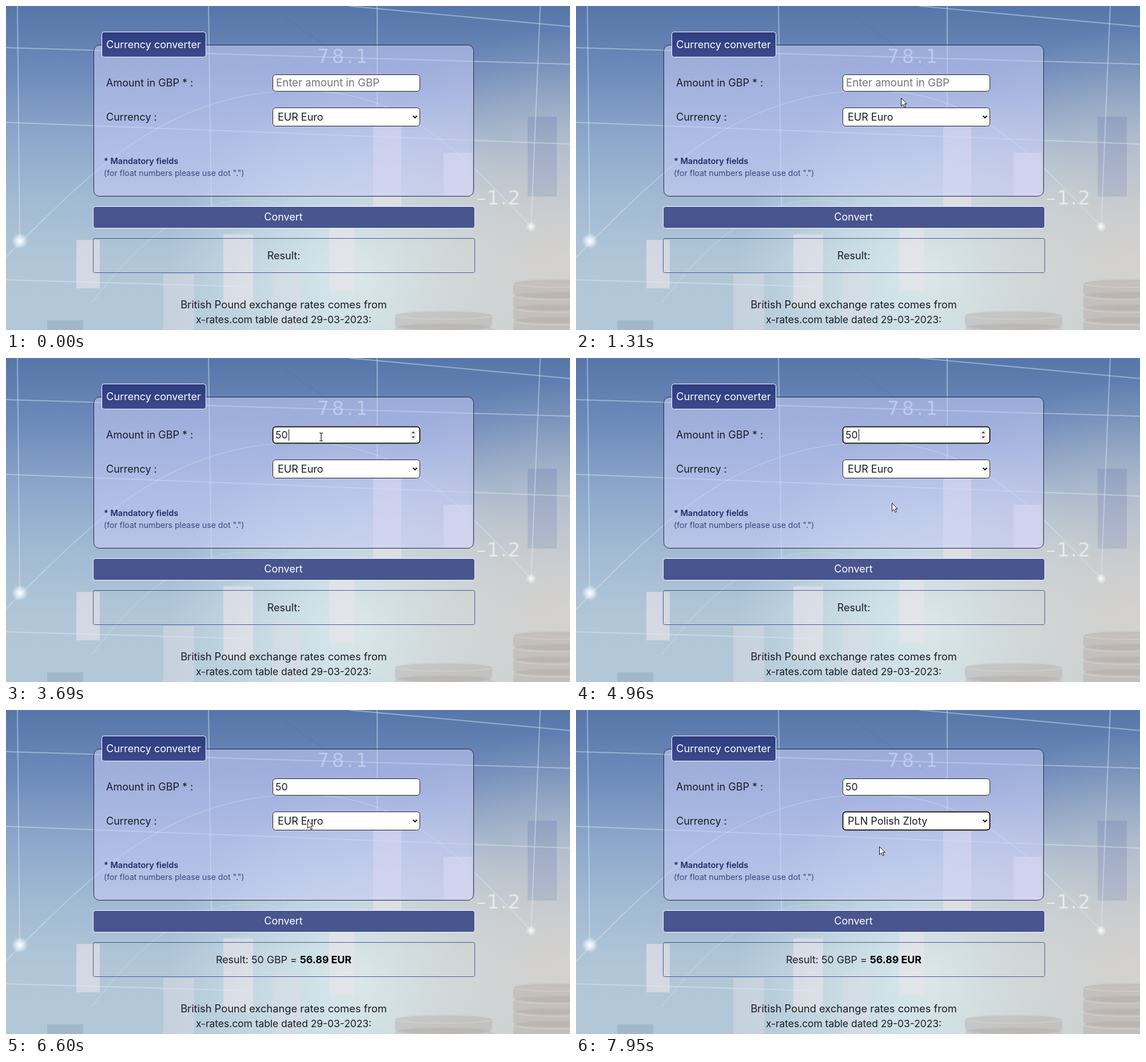
An HTML page with a canvas that plays this animation: 986x568 px, repeating every 8000 ms.

```html
<!DOCTYPE html>
<html lang="en">
<head>
<meta charset="utf-8">
<title>Currency converter</title>
<style>
html, body { margin: 0; width: 100%; height: 100%; overflow: hidden; background: #7d9cc4; }
canvas { display: block; width: 986px; height: 568px; }
</style>
</head>
<body>
<canvas id="stage" width="986" height="568"></canvas>
<script>
const W = 986, H = 568, LOOP = 8000;
const stage = document.getElementById('stage').getContext('2d');
const backdrop = document.createElement('canvas');
backdrop.width = W;
backdrop.height = H;
let ctx = stage;

const SANS = 'Inter, "Open Sans", sans-serif';
const WIDE = '"DejaVu Sans", sans-serif';
const INK = '#1b1b26';
const OPTIONS = ['EUR Euro', 'PLN Polish Zloty', 'USD US Dollar'];

const BUTTON = { x: 152.5, y: 351.5, w: 667, h: 38 };
const INPUT = { x: 466.5, y: 120.5, w: 257, h: 29 };
const SELECT = { x: 466.5, y: 178.5, w: 257, h: 32 };
const inside = (p, b) => p.x >= b.x && p.x <= b.x + b.w && p.y >= b.y && p.y <= b.y + b.h;

function label(text, x, y, { size = 18, weight = 400, color = INK, align = 'left', font = SANS } = {}) {
  ctx.font = `${weight} ${size}px ${font}`;
  ctx.fillStyle = color;
  ctx.textAlign = align;
  ctx.fillText(text, x, y);
  return ctx.measureText(text).width;
}

function box({ x, y, w, h }, radius, fill, stroke, line = 1) {
  ctx.beginPath();
  ctx.roundRect(x, y, w, h, radius);
  if (fill) { ctx.fillStyle = fill; ctx.fill(); }
  if (stroke) { ctx.strokeStyle = stroke; ctx.lineWidth = line; ctx.stroke(); }
}

function rect(x, y, w, h, fill) {
  ctx.fillStyle = fill;
  ctx.fillRect(x, y, w, h);
}

function trace(path, color, width = 1) {
  ctx.strokeStyle = color;
  ctx.lineWidth = width;
  ctx.stroke(new Path2D(path));
}

function linear(y0, y1, colors) {
  const g = ctx.createLinearGradient(0, y0, 0, y1);
  colors.forEach((c, i) => g.addColorStop(i / (colors.length - 1), c));
  return g;
}

function glow(x, y, r, rgb, alpha) {
  const g = ctx.createRadialGradient(x, y, 0, x, y, r);
  g.addColorStop(0, `rgba(${rgb},${alpha})`);
  g.addColorStop(0.5, `rgba(${rgb},${alpha * 0.55})`);
  g.addColorStop(1, `rgba(${rgb},0)`);
  rect(x - r, y - r, 2 * r, 2 * r, g);
}

function coins(x, y, w, count) {
  for (let i = count - 1; i >= 0; i--) {
    const top = y + i * 22;
    ctx.beginPath();
    ctx.ellipse(x + w / 2, top + 18, w / 2, 8, 0, 0, Math.PI);
    ctx.ellipse(x + w / 2, top, w / 2, 8, 0, Math.PI, 2 * Math.PI);
    ctx.fillStyle = 'rgba(176,166,160,.4)';
    ctx.fill();
    ctx.beginPath();
    ctx.ellipse(x + w / 2, top, w / 2, 7, 0, 0, 2 * Math.PI);
    ctx.strokeStyle = 'rgba(232,224,216,.4)';
    ctx.lineWidth = 1.5;
    ctx.stroke();
  }
}

function drawScenery() {
  rect(0, 0, W, H, linear(0, H, ['#5776a9', '#6c8aba', '#8ca7cb', '#a2bad3', '#b1c7d8', '#b2c8d8']));
  glow(620, 470, 340, '224,240,240', 0.85);
  glow(980, 450, 410, '220,212,204', 0.85);

  const pale = 'rgba(236,228,234,.6)';
  [[642, 212, 49, 140], [765, 257, 50, 77], [123, 410, 41, 85], [380, 400, 52, 130],
   [565, 390, 44, 110]].forEach(b => rect(...b, pale));
  [[275, 470, 54, 98], [466, 462, 48, 106]].forEach(b => rect(...b, 'rgba(222,220,228,.45)'));
  rect(912, 194, 51, 140, linear(194, 334, ['rgba(128,146,188,.5)', 'rgba(158,170,198,.5)']));
  rect(72, 551, 63, 17, 'rgba(150,168,190,.5)');

  const grid = 'rgba(222,234,248,.45)';
  trace('M0 73L986 102M0 204L986 242M0 480L420 492M600 0L986 36', grid, 2);
  trace('M20 0L24 412M354 0L359 350M649 0V210M934 0L918 387', grid, 2);
  trace('M490 20L640 130', 'rgba(70,95,145,.35)', 1);
  trace('M0 440C140 300 260 170 470 150C680 132 780 240 918 387', 'rgba(235,245,255,.35)', 1.6);
  trace('M150 520C240 400 340 320 470 345', 'rgba(235,245,255,.2)', 1.6);

  ctx.letterSpacing = '5px';
  label('78.1', 544, 100, { size: 33, color: 'rgba(225,232,248,.6)', font: WIDE });
  ctx.letterSpacing = '2px';
  label('–1.2', 822, 348, { size: 34, color: 'rgba(250,248,245,.65)', font: WIDE });
  ctx.letterSpacing = '0px';

  coins(887, 486, 150, 4);
  coins(680, 542, 170, 2);
  glow(24, 412, 14, '255,255,255', 1);
  glow(918, 387, 9, '255,255,255', 0.9);
}

function drawPage() {
  box({ x: 153.5, y: 68.5, w: 664, h: 265 }, 10, 'rgba(202,206,250,.55)', '#24263c');
  box({ x: 167.5, y: 45.5, w: 182, h: 44 }, 4, linear(45, 90, ['#2e3d80', '#3d4a8c']), '#fff');
  label('Currency converter', 258, 74, { color: '#fff', align: 'center' });
  label('Amount in GBP * :', 175, 141);
  label('Currency :', 175, 201);
  label('* Mandatory fields', 171, 277, { size: 14.5, weight: 600, color: '#1f2c66' });
  label('(for float numbers please use dot ".")', 171, 298, { size: 14.1, color: '#39477c' });
  box({ x: 152.5, y: 407.5, w: 667, h: 60 }, 3, null, '#4c5a93');
  label('British Pound exchange rates comes from', 485.5, 530, { size: 18.3, align: 'center' });
  label('x-rates.com table dated 29-03-2023:', 485.5, 556, { size: 17.4, align: 'center' });
}

// Each move advances in even steps between its first and last change.
const smooth = p => p * p * (3 - 2 * p);
const MOVES = [
  { start: 400, end: 1170, steps: 12, from: [924, 575], to: [590, 191], ease: p => p },
  { start: 1240, end: 1660, steps: 7, from: [590, 191], to: [551, 138], ease: p => 1 - (1 - p) ** 2.5 },
  { start: 4550, end: 5310, steps: 12, from: [551, 138], to: [552, 369], ease: smooth },
  { start: 6260, end: 6600, steps: 6, from: [552, 369], to: [527, 193], ease: smooth },
  { start: 7270, end: 7740, steps: 7, from: [527, 193], to: [530, 239], ease: smooth }
];

function pointerAt(t) {
  const move = MOVES.filter(m => t >= m.start).pop();
  if (!move) return null;
  const { start, end, steps, from, to, ease } = move;
  const step = Math.floor((t - start) / (end - start) * (steps - 1) + 1e-6) + 1;
  const p = ease(Math.min(step / steps, 1));
  return { x: Math.round(from[0] + (to[0] - from[0]) * p), y: Math.round(from[1] + (to[1] - from[1]) * p) };
}

function drawPointer({ x, y }, kind) {
  ctx.save();
  ctx.translate(x, y);
  if (kind === 'text') {
    trace('M-3 -6.5H-1L0 -5.5L1 -6.5H3M0 -5.5V6.5M-3 7.5H-1L0 6.5L1 7.5H3', '#111', 1.2);
  } else {
    const shape = new Path2D(kind === 'hand'
      ? 'M-2 1Q0 -2 1.5 1V6Q4 4.5 5 6.5Q7 5.5 8 7.5Q11 7 11 10V14L9 18.5H1L-3.5 12Q-5 9 -2 10Z'
      : 'M.5 .5V14.5L3.8 11.4L6.2 16.5L8.4 15.5L6.1 10.6H10.3Z');
    ctx.fillStyle = '#fff';
    ctx.fill(shape);
    ctx.strokeStyle = '#111';
    ctx.lineWidth = 1;
    ctx.lineJoin = 'round';
    ctx.stroke(shape);
    if (kind === 'hand') trace('M1.5 6V10M5 7V10M8 8V10', '#111', 0.9);
  }
  ctx.restore();
}

function field(area, focused) {
  if (focused) {
    box({ x: area.x - 1.5, y: area.y - 1.5, w: area.w + 3, h: area.h + 3 }, 6, '#fff');
    box(area, 5, '#fff', '#101010', 2);
  } else {
    box(area, 5, '#fff', '#222');
  }
}

function drawInput(t, hovered) {
  const focused = t >= 1800 && t < 5380;
  const value = t < 3210 ? '' : t < 3480 ? '5' : '50';
  field(INPUT, focused);
  if (focused || hovered) {
    rect(706, 126, 12, 18, '#f0f0f0');
    ctx.fillStyle = '#4a4a4a';
    ctx.fill(new Path2D('M709 132L712 128.5L715 132ZM709 137.5H715L712 141Z'));
  }
  if (!value) label('Enter amount in GBP', 472, 141, { size: 18.6, color: '#757575' });
  const width = value ? label(value, 471, 141, { size: 17.6 }) : 0;
  const blink = t >= 2330 && t < 2860;
  if (focused && !blink) rect(Math.round(472 + width), 125, 1, 20, '#111');
}

function drawSelect(t) {
  field(SELECT, t >= 7880);
  label(OPTIONS[t < 7880 ? 0 : 1], 475, 201);
  trace('M711.5 192.5L715 196L718.5 192.5', '#111', 2);
}

function withShadow(blur, draw) {
  ctx.save();
  ctx.shadowColor = 'rgba(0,0,0,.3)';
  ctx.shadowBlur = blur;
  ctx.shadowOffsetY = 1;
  draw();
  ctx.restore();
}

function drawSuggestions(t) {
  if (t < 1870 || t >= 3690) return;
  const typed = t >= 3210;
  const items = typed ? ['50', '55.90'] : ['0', '50', '55.90', '74.14', '1000.00', '100.00'];
  ctx.save();
  if (t >= 3480) ctx.globalAlpha = 1 - (Math.floor((t - 3480) / 70) + 1) / 4;
  withShadow(3, () => {
    box({ x: 551, y: 157.5, w: typed ? 61 : 72, h: 6 + items.length * 31 }, 3, '#fff');
  });
  ctx.fillStyle = '#fff';
  ctx.fill(new Path2D('M561 158L568.5 151.5L576 158Z'));
  items.forEach((text, i) => {
    label(text, 561, 181 + i * 30.8, { size: 11, color: '#222', font: '"Open Sans", sans-serif' });
  });
  ctx.restore();
}

function drawOptions(t, pointer) {
  if (t < 7000 || t >= 7880) return;
  const row = 23, top = 212;
  const active = Math.max(0, Math.floor((pointer.y - top) / row));
  withShadow(3, () => rect(467, top - 1, 257, 71, '#fff'));
  OPTIONS.forEach((text, i) => {
    const on = i === active;
    if (on) rect(468, top + i * row, 255, row, '#1967d2');
    label(text, 475, top + 17 + i * row, { color: on ? '#fff' : INK });
  });
  ctx.strokeStyle = '#767676';
  ctx.lineWidth = 1;
  ctx.strokeRect(467.5, top - 0.5, 256, 70);
}

function drawResult(t) {
  if (t < 5650) {
    label('Result:', 485.5, 444, { align: 'center' });
    return;
  }
  const lead = 'Result: 50 GBP = ', total = '56.89 EUR', size = 17.8;
  ctx.font = `400 ${size}px ${SANS}`;
  const leadWidth = ctx.measureText(lead).width;
  ctx.font = `700 ${size}px ${SANS}`;
  const x = 485.5 - (leadWidth + ctx.measureText(total).width) / 2;
  label(lead, x, 444, { size });
  label(total, x + leadWidth, 444, { size, weight: 700, color: '#000' });
}

function render(t) {
  const pointer = pointerAt(t);
  const overButton = pointer && inside(pointer, BUTTON);
  const overInput = pointer && inside(pointer, INPUT);
  ctx.drawImage(backdrop, 0, 0);
  box(BUTTON, 4, overButton ? '#5766b6' : '#49558f', '#fff');
  label('Convert', 485, 376, { color: '#fff', align: 'center' });
  drawInput(t, overInput);
  drawSelect(t);
  drawResult(t);
  drawSuggestions(t);
  drawOptions(t, pointer);
  if (pointer) drawPointer(pointer, overButton ? 'hand' : overInput ? 'text' : 'arrow');
}

ctx = backdrop.getContext('2d');
drawScenery();
drawPage();
ctx = stage;

const began = performance.now();
function tick() {
  render((performance.now() - began) % LOOP);
  requestAnimationFrame(tick);
}
tick();
</script>
</body>
</html>
```
